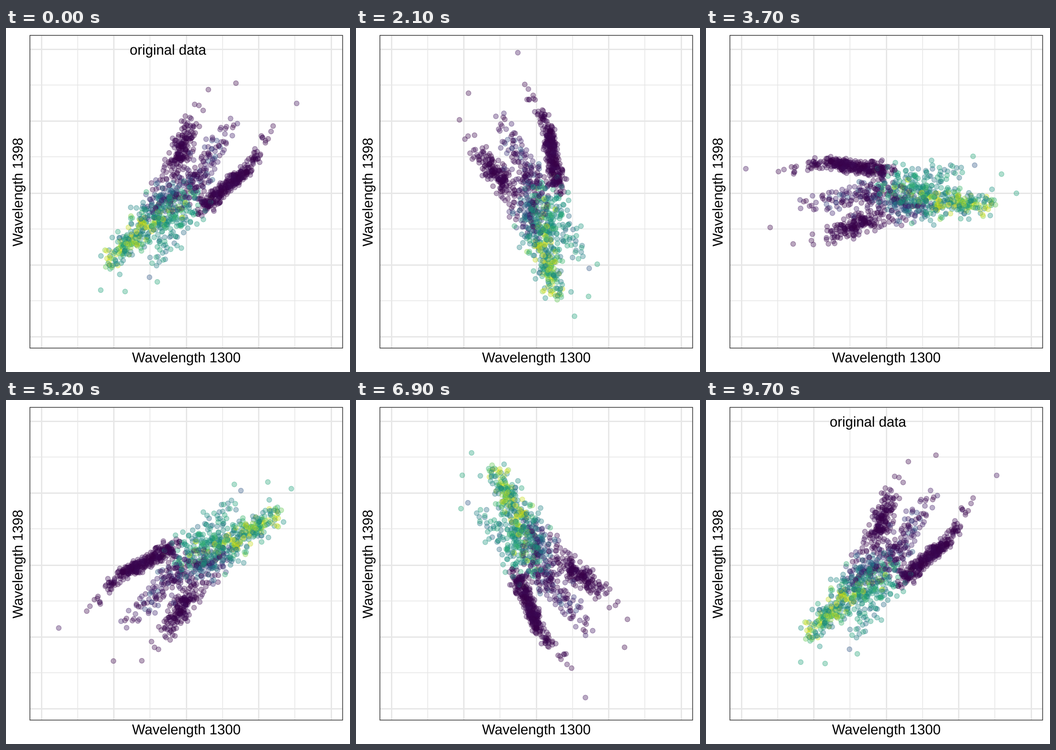
Animation of 748x748 px, one loop 10000 ms. Source, as a matplotlib script:

```python
import numpy as np
import matplotlib.pyplot as plt
from matplotlib.animation import FuncAnimation
from matplotlib.patches import Rectangle

SIZE, DPI = 748, 100
PX = 72 / DPI                      # points per pixel
FRAMES, STEP_MS = 100, 100
CENTER = np.array([392.0, 358.5])
UNIT = np.array([157.5, -156.2])   # pixels per data unit
STEPS = 99                         # rotation steps in one full turn
FIRST_PC, SECOND_PC = 37, 87       # steps where the main axis lies flat

plt.rcParams["font.family"] = "Liberation Sans"
plt.rcParams["text.hinting"] = "none"
rng = np.random.default_rng(21)


def strand(n, path, a, b, spread, low, high):
    """Points strewn along a path, beta(a, b) dense, with normal scatter."""
    xs, ys = zip(*path)
    t = rng.beta(a, b, n)
    knots = np.linspace(0, 1, len(path))
    off = np.clip(rng.normal(size=(n, 2)), -2, 2) * spread
    off *= (1.15 - .6 * t)[:, None]
    return np.column_stack([np.interp(t, knots, xs) + off[:, 0],
                            np.interp(t, knots, ys) + off[:, 1],
                            rng.uniform(low, high, n)])


def make_points():
    right = [(413, 398), (475, 350), (525, 306), (575, 232), (618, 180)]
    left = [(326, 385), (370, 295), (388, 248), (420, 155)]
    middle = [(384, 370), (417, 322), (457, 250), (500, 202)]
    green = [(415, 362), (355, 398), (300, 432), (250, 482), (208, 530)]
    mixed = [(372, 355), (345, 368), (308, 408)]
    fringe = [(400, 408), (360, 452), (334, 492), (308, 526)]
    spot = [(292, 421), (296, 422)]
    ends = [(632, 164, .05), (500, 120, 0), (440, 134, 0), (206, 570, .6),
            (259, 573, .62), (329, 552, .62), (312, 542, .3)]
    clouds = [
        strand(310, right, 2.1, 4.8, 8.5, 0, .04),
        strand(190, left, 2.6, 2.8, 15, 0, .04),
        strand(125, middle, 1.5, 2.2, 15, 0, .12),
        strand(26, middle, 1.5, 2.6, 18, .18, .34),
        strand(85, mixed, 1.3, 1.3, 17, .06, .45),
        strand(255, green, 1.5, 2.3, 23, .4, .66),
        strand(60, green, 1.8, 2, 20, .68, .88),
        strand(48, green, 4, 3, 16, .88, 1),
        strand(10, spot, 1, 1, 4, .9, 1),
        strand(42, fringe, 1.2, 1.6, 16, .36, .62),
    ]
    pts = np.vstack(clouds)
    rng.shuffle(pts)
    return np.vstack([pts, ends])


def step_at(frame):
    """Rotation step on show: three runs with rests between."""
    t = frame * STEP_MS
    if t < 4600:
        return int(np.clip((t - 760) // 80, 0, FIRST_PC))
    if t < 8600:
        u = (t - 4520) / 1000
        return int(min(FIRST_PC + 1 + 11.75 * u + .7 * u * u, SECOND_PC))
    return int(min(SECOND_PC + 1 + (t - 8560) // 80, STEPS))


def caption_for(step):
    if step % STEPS == 0:
        return "original data"
    if step in (FIRST_PC, SECOND_PC):
        return "principal components"
    return ""


points = make_points()
data = (points[:, :2] - CENTER) / UNIT
rgba = plt.get_cmap("viridis")(points[:, 2])
rgba[:, :3] **= 1.15
rgba[:, 3] = .35

fig = plt.figure(figsize=(SIZE / DPI, SIZE / DPI), dpi=DPI, facecolor="white")
ax = fig.add_axes([0, 0, 1, 1])
ax.set(xlim=(0, SIZE), ylim=(SIZE, 0))
ax.axis("off")

LEFT, TOP, RIGHT, BOTTOM = 52, 15.5, 732, 696
for k in range(-4, 5):
    width = (1.6 if k % 2 else 3) * PX
    gx, gy = CENTER + UNIT * k / 2
    style = dict(color="#e7e7e7", lw=width, zorder=1, solid_capstyle="butt")
    ax.plot([gx, gx], [TOP, BOTTOM], **style)
    ax.plot([LEFT, RIGHT], [gy, gy], **style)

dots = ax.scatter(points[:, 0], points[:, 1], s=(10.7 * PX) ** 2,
                  facecolors=rgba, edgecolors=rgba, linewidths=1.4 * PX,
                  zorder=2)
ax.add_patch(Rectangle((LEFT, TOP), RIGHT - LEFT, BOTTOM - TOP, fill=False,
                       ec="#333333", lw=1.5 * PX, zorder=3))

font = dict(fontsize=22, color="black", ha="center", va="baseline", zorder=4)
ax.text(392, 727, "Wavelength 1300", **font)
ax.text(37, 356, "Wavelength 1398", rotation=90, rotation_mode="anchor", **font)
caption = ax.text(352, 58, "", **font)


def draw(frame):
    step = step_at(frame)
    a = 2 * np.pi * step / STEPS
    turn = np.array([[np.cos(a), np.sin(a)], [-np.sin(a), np.cos(a)]])
    dots.set_offsets(CENTER + (data @ turn) * UNIT)
    caption.set_text(caption_for(step))
    return dots, caption


anim = FuncAnimation(fig, draw, frames=FRAMES, interval=STEP_MS,
                     repeat=True, repeat_delay=0, blit=False)
plt.show()
```
